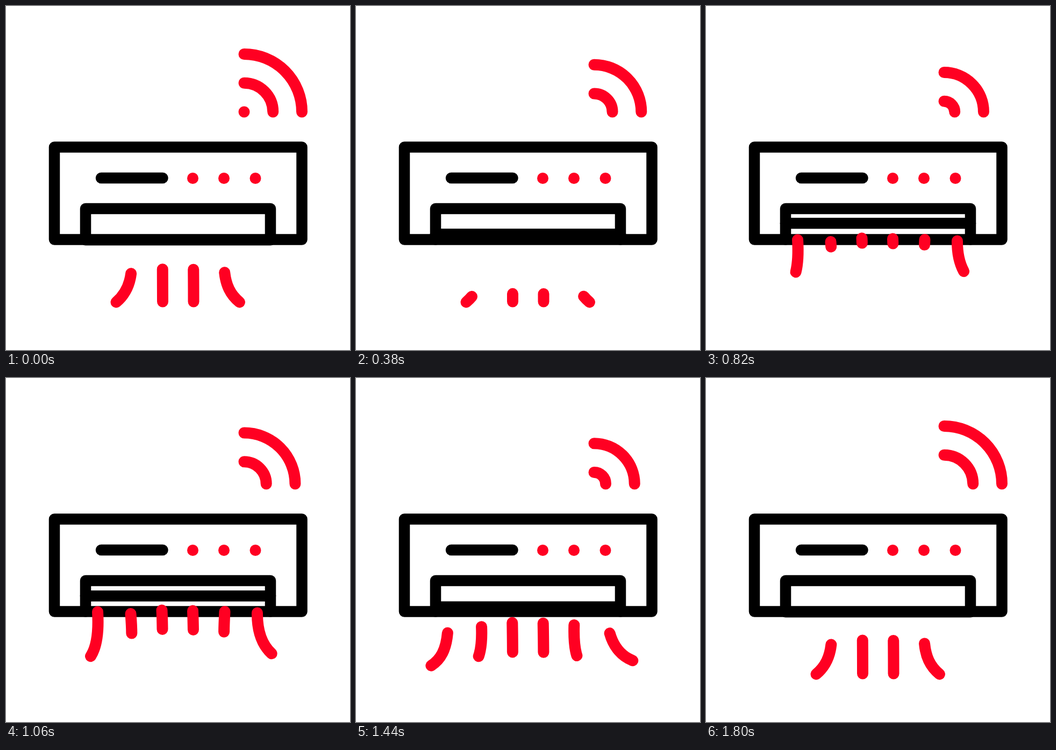
Recreate the animation shown at these times as an HTML page. Size 640 px wide and 640 px high, loop 1820 ms.

```html
<!DOCTYPE html>
<html lang="en">
<head>
<meta charset="utf-8">
<title>Air conditioner</title>
<style>
  html, body { margin: 0; height: 100%; overflow: hidden; background: #fff; }
  svg { display: block; width: 100vw; height: 100vh; }
  path { fill: none; stroke: #000; stroke-width: 20.5; stroke-linecap: round; stroke-linejoin: round; }
  .red path { stroke: #ff0022; stroke-width: 21; }
</style>
</head>
<body>
<svg viewBox="0 0 640 640">
  <path d="M90 262.5H550.5V434.5H90Z"/>
  <path d="M148 434.5V377H492V434.5"/>
  <path d="M177 320H291.5"/>
  <path id="slat" d="M148 0H492"/>
  <g class="red">
    <path d="M347.5 320.5h.01M405.5 320.5h.01M464 320.5h.01"/>
    <g id="rings"><path/><path/><path/></g>
    <g id="outer">
      <path pathLength="1" d="M170.5 435C174 495 163 524 133 539"/>
      <path pathLength="1" d="M467.5 437C467 490 491 520 522 528"/>
    </g>
    <g id="inner">
      <path pathLength="1" d="M232 438.5C236 490 236 525 205 551"/>
      <path pathLength="1" d="M290 432Q291.5 460 291.5 550"/>
      <path pathLength="1" d="M347.5 433Q349 470 349 550"/>
      <path pathLength="1" d="M407 434.5C404 490 403 525 434.5 551"/>
    </g>
  </g>
</svg>
<script>
const LOOP = 1820, END = 1800, STEP = 20;
const get = id => document.getElementById(id);
const slat = get('slat');
const rings = [...get('rings').children];
const outer = [...get('outer').children];
const inner = [...get('inner').children];

// Progress from 0 to 1 between two times
const span = (t, from, to) => Math.min(1, Math.max(0, (t - from) / (to - from)));
const show = (el, on) => el.style.display = on ? '' : 'none';

function easeInOut(u) {
  const half = v => (2 * v) ** 2.2 / 2;
  return u < .5 ? half(u) : 1 - half(1 - u);
}

// Keeps only the part of each path between two fractions of its length
function trim(paths, tail, tip) {
  for (const p of paths) {
    show(p, tip > tail);
    p.style.strokeDasharray = `${Math.max(0, tip - tail)} 3`;
    p.style.strokeDashoffset = -tail;
  }
}

function draw(t) {
  const lift = easeInOut(1 - Math.abs(t - 900) / 900);
  slat.setAttribute('transform', `translate(0 ${435.3 - 31.3 * lift})`);

  const wave = t >= END ? 1 : t % 600 / 600;
  rings.forEach((ring, i) => {
    const r = Math.max(.02, 53.75 * (wave + i));
    ring.setAttribute('d', `M443 ${197 - r}A${r} ${r} 0 0 1 ${443 + r} 197`);
    show(ring, i < 2 || t < STEP);
  });

  trim(outer, span(t, 1200, END) ** 1.2, 1 - (1 - span(t, 400, END)) ** 2);

  // Inner streams carry over the loop seam
  if (t < 600) trim(inner, .49 + .51 * span(t, 0, 500), 1);
  else trim(inner, .475 * span(t, 1180, END), span(t, 738, END));
}

const start = performance.now();
function frame() {
  const t = (performance.now() - start) % LOOP;
  draw(Math.floor(t / STEP) * STEP);
  requestAnimationFrame(frame);
}
frame();
</script>
</body>
</html>
```
